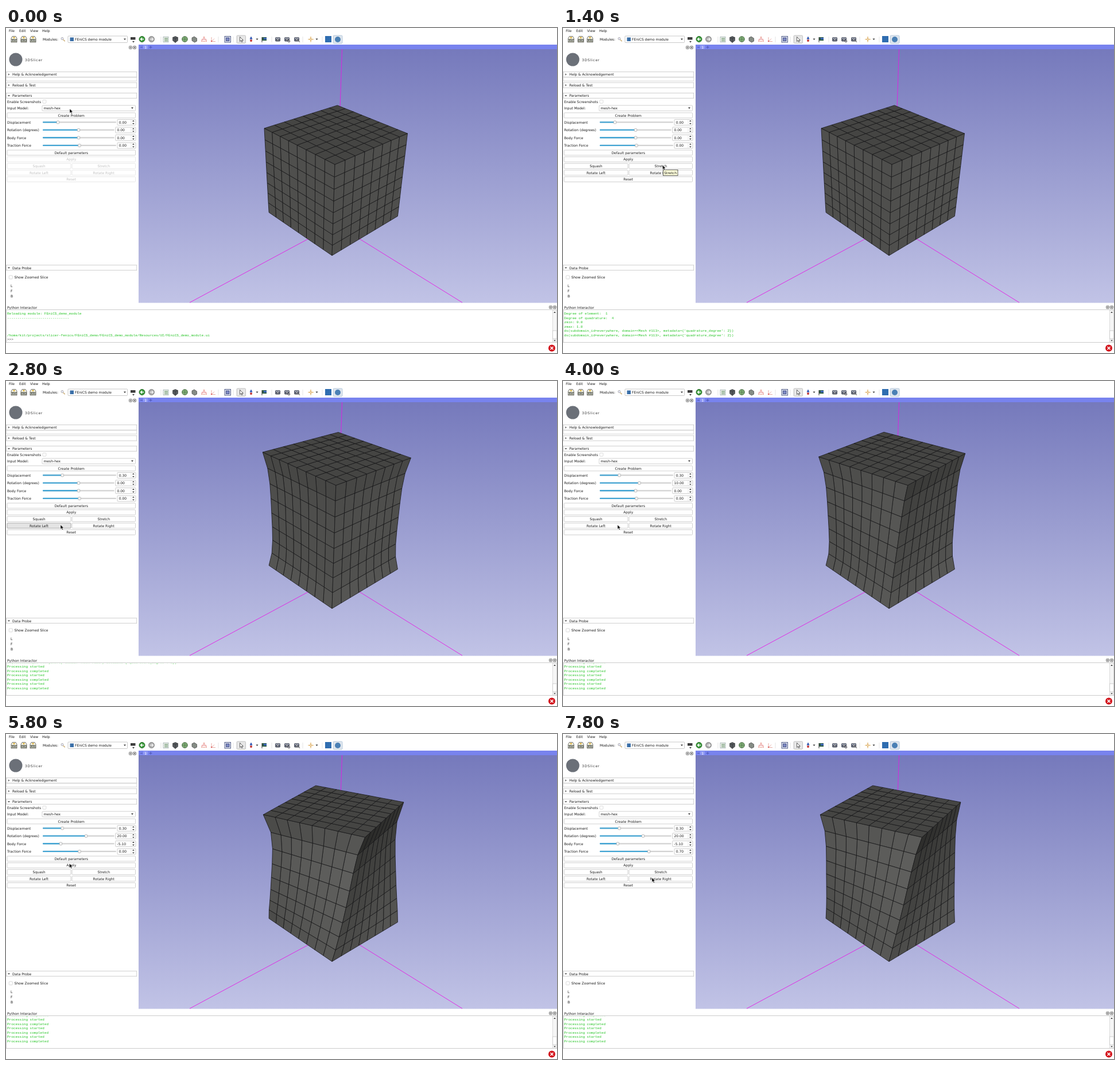
An HTML page that plays this animation: 960x567 px, repeating every 8 s.

```html
<!DOCTYPE html>
<html lang="en">
<head>
<meta charset="utf-8">
<title>Mesh deformation demo</title>
<style>
html, body { margin: 0; width: 100%; height: 100%; overflow: hidden; background: #fff; }
svg { display: block; width: 960px; height: 567px; }
text { font: 6px "DejaVu Sans", sans-serif; white-space: pre; }
.mono { font-family: "Liberation Mono", monospace; }
</style>
</head>
<body>
<svg id="stage" viewBox="0 0 960 567"></svg>
<script>
const LOOP = 8000, STEP = 200;
const stage = document.getElementById('stage');

// ---- drawing helpers (all return SVG markup)
const esc = s => s.replace(/&/g, '&amp;').replace(/</g, '&lt;');
const text = (x, y, s, fill = '#1c1c1c', more = '') =>
  `<text x="${x}" y="${y}" fill="${fill}" ${more}>${esc(s)}</text>`;
const mid = (x, y, s, fill) => text(x, y, s, fill, 'text-anchor="middle"');
const rect = (x, y, w, h, fill = '#fff', stroke = 'none', rx = 0) =>
  `<rect x="${x}" y="${y}" width="${w}" height="${h}" fill="${fill}" stroke="${stroke}" stroke-width=".8" rx="${rx}"/>`;
const path = (d, fill = 'none', stroke = 'none', w = 1) =>
  `<path d="${d}" fill="${fill}" stroke="${stroke}" stroke-width="${w}"/>`;
const dot = (x, y, r, fill, stroke = 'none') =>
  `<circle cx="${x}" cy="${y}" r="${r}" fill="${fill}" stroke="${stroke}"/>`;
const down = (x, y) => path(`M${x - 2} ${y - 1}h4l-2 2.4z`, '#333');

// ---- timing: stepped values and an interpolated pointer path
const stepped = (t, start, ...keys) => keys.reduce((v, [at, next]) => t >= at ? next : v, start);

const POINTER = [
  [0, 111, 141], [400, 114, 150], [800, 114, 150], [1200, 173.5, 239.5], [2200, 173.5, 239.5],
  [2600, 120, 250], [2800, 95, 251], [4600, 95, 251], [4800, 126, 189], [5000, 126, 189],
  [5400, 96, 189], [5800, 110.5, 226], [6000, 110.5, 226], [6200, 128, 203], [6400, 137, 203],
  [6600, 150, 203], [7000, 112, 226], [7200, 112, 226], [7400, 92, 237], [7800, 155, 251]
];
function pointerAt(t) {
  const i = POINTER.findIndex(p => p[0] >= t);
  if (i < 1) return POINTER[i ? POINTER.length - 1 : 0].slice(1);
  const [a, b] = [POINTER[i - 1], POINTER[i]], k = (t - a[0]) / (b[0] - a[0]);
  return [a[1] + (b[1] - a[1]) * k, a[2] + (b[2] - a[2]) * k];
}

function stateAt(t) {
  return {
    t,
    disp: stepped(t, 0, [1600, .1], [1800, .2], [2000, .3]),
    rot: stepped(t, 0, [3200, 10], [4400, 20]),
    body: stepped(t, 0, [5200, -2.6], [5400, -5.1]),
    traction: stepped(t, 0, [6400, .3], [6600, .7]),
    sag: stepped(t, 0, [5800, .28], [7000, .12]),
    bulge: stepped(t, 0, [7000, .025]),
    runs: stepped(t, 0, [1600, 1], [1800, 2], [2000, 3], [3200, 4], [4400, 5], [5800, 6], [7000, 7]),
    ready: t >= 600,
    hover: stepped(t, '', [400, 'Create Problem'], [600, ''], [1600, 'Stretch'], [2400, ''],
      [2800, 'Rotate Left'], [3800, '']),
    tip: t >= 1400 && t < 1600
  };
}

// ---- mesh: unit cube, origin at the top front corner, d runs downwards
const O = [573, 238, 1], X = [-55.8, -36.9, .1494], Y = [241, -23.9, .1637], D = [68.84, 210.6, .13];
const VIEW = [-.61, -.61, .5], N = 8;

function project([x, y, d]) {
  const [u, v, w] = O.map((o, i) => o + x * X[i] + y * Y[i] + d * D[i]);
  return (u / w).toFixed(1) + ' ' + (v / w).toFixed(1);
}
// Both ends are clamped; stretching narrows the middle, sagging moves the strain upwards.
function deform([x, y, d], s) {
  const h = 1 - d, a = s.rot * h * Math.PI / 180;
  const strain = s.disp + s.sag * (2 * h - 1);
  const k = 1 - (.27 * strain - s.bulge) * (1 - (2 * h - 1) ** 4);
  const c = Math.cos(a) * k, q = Math.sin(a) * k;
  x -= .5; y -= .5;
  return [.5 + x * c + y * q, .5 - x * q + y * c, d - s.disp * h + s.sag * h * d];
}
function shade([a, b, c, e]) {
  const u = c.map((v, i) => v - a[i]), w = e.map((v, i) => v - b[i]);
  const n = [u[1] * w[2] - u[2] * w[1], u[2] * w[0] - u[0] * w[2], u[0] * w[1] - u[1] * w[0]];
  const lit = Math.abs(n[0] * VIEW[0] + n[1] * VIEW[1] - n[2] * VIEW[2]) / Math.hypot(...n);
  const g = Math.round(25 + 88 * lit);
  return `rgb(${g},${g},${g - 2})`;
}
function mesh(s) {
  const faces = [(i, j) => [i, 0, j], (i, j) => [0, i, j], (i, j) => [i, j, 0]];
  let out = '';
  for (const face of faces)
    for (let i = 0; i < N; i++)
      for (let j = 0; j < N; j++) {
        const quad = [[0, 0], [1, 0], [1, 1], [0, 1]]
          .map(([p, q]) => deform(face((i + p) / N, (j + q) / N), s));
        out += path('M' + quad.map(project).join('L') + 'z', shade(quad), '#141414', .75);
      }
  return out;
}

function viewport(s) {
  return `<defs><linearGradient id="sky" x2="0" y2="1"><stop stop-color="#7478bb"/>
    <stop offset="1" stop-color="#c1c3e6"/></linearGradient></defs>` +
    rect(231, 29, 729, 450.5, 'url(#sky)') + rect(231, 29, 729, 8, '#7883ee') +
    rect(239, 30, 8, 6.5, '#8f99f5') + text(241.3, 35.8, '1', '#fff') +
    path('M234 33.5h4M252 31v5M249.5 33.5h5', 'none', '#4d56b8') +
    path('M585.5 37L582 140M545 358L320 479M600 358L795 479', 'none', '#e619e6', .9) + mesh(s);
}

// ---- toolbar
function toolbar() {
  const menu = [[5, 'File'], [23, 'Edit'], [42, 'View'], [63, 'Help']].map(([x, s]) => text(x, 7, s)).join('');
  const files = [[14, 'DATA'], [31, 'DCM'], [47, 'SAVE']].map(([x, s]) =>
    path(`M${x - 5} 18l2-3.5h6l2 3.5v7h-10z`, '#f4f2e2', '#444', .7) + path(`M${x - 2} 15.8h4l-2 2.6z`, '#d4a017') +
    rect(x - 5, 19.5, 10, 4.2, '#454a3c') +
    text(x, 22.9, s, '#fff', 'text-anchor="middle" style="font-size:3.4px;font-weight:bold"')).join('');
  const cube = (x, c) => path(`M${x} 14.5l4.5 2v5.5l-4.5 3.5-4.5-3.5v-5.5z`, c, '#333', .6) +
    path(`M${x - 4.5} 16.5l4.5 2 4.5-2M${x} 18.5v7`, 'none', '#222', .5);
  const camera = x => rect(x - 4, 16.5, 8, 6.5, '#6a7084', '#3a3f4c', 1) +
    rect(x - 3, 17.2, 6, 1.4, '#c4cad8') + dot(x, 20.4, 1.6, '#dfe4ee', '#333');
  const bars = [270, 370, 396, 463, 517, 551].map(x => path(`M${x} 15v10`, 'none', '#e4e4e4')).join('');
  return menu + files + bars + text(64, 22, 'Modules:') +
    dot(98, 18.5, 2, '#eef', '#aaa') + path('M99.8 20.2l2.8 3', 'none', '#c9a86a', 1.3) +
    rect(108, 14, 103.5, 11.5, '#fff', '#bbb', 1) + rect(111.5, 16.5, 6.5, 6.5, '#3b6fa8') +
    text(120, 22, 'FEniCS demo module') + down(207, 19.5) +
    rect(217, 16, 8.5, 4.5, '#3d3d3d') + down(222, 24) +
    dot(237, 19.5, 5, '#3b9a3b', '#2c6e2c') + path('M240 19.5h-5m2-2.4l-2.4 2.4 2.4 2.4', 'none', '#fff', 1.4) +
    dot(253.5, 19.5, 5, '#aaa', '#8a8a8a') + path('M251 19.5h5m-2-2.4l2.4 2.4-2.4 2.4', 'none', '#eee', 1.4) +
    rect(274, 15.5, 9, 9, '#f2f5ef', '#9aa', 0) + path('M276 18h6M276 20h6M276 22.4h6', 'none', '#4c7d52', .9) +
    cube(295, '#555a5e') + dot(311.5, 19.5, 4.8, '#7fae76', '#4a6a46') +
    path('M307 19.5h9M311.5 15v9', 'none', '#4a6a46', .6) +
    path('M324 17l4-2 4.5 3v5l-4 2-4.5-3z', '#858c85', '#444', .7) +
    path('M345 16v3.5M341.5 23v-3.5h7V23', 'none', '#d66', .8) +
    [[345, 16], [341.5, 23], [345, 23], [348.5, 23]].map(p => dot(...p, 1.1, '#e58a7c')).join('') +
    path('M358 16v7.5h7M358 23.5l5-5', 'none', '#e0988e', .8) + dot(358, 23, 1.2, '#d66') +
    rect(381, 14.5, 10.5, 10.5, '#dfe3f4', '#34406e') + rect(383.5, 17, 5.5, 5.5, '#7d89c4', '#34406e') +
    rect(402, 13, 15.5, 13.5, '#e6e6e6', '#b5b5b5', 1.5) +
    path('M407.5 15.5v8l2-1.8 1.3 2.8 1.1-.5-1.2-2.7h2.6z', '#fff', '#222', .7) +
    path('M427 14.5l2.5 5h-5z', '#274fae') + dot(427, 22, 2, '#c43a3a') + down(437.5, 19.5) +
    rect(446, 16, 8, 6, '#2d5c46') + rect(449, 17, 5, 3, '#3e66b8') + path('M446 16v9', 'none', '#333') +
    camera(473.5) + camera(489.5) + dot(493, 23, 1.6, '#dde', '#444') + camera(506.5) +
    path('M508 21l4 3.5', 'none', '#777', 1.2) +
    path('M531 15v9.5M526.3 19.7h9.5', 'none', '#d9a24a', 1.1) + dot(531, 19.7, 1.5, '#fff', '#d9a24a') +
    down(541.5, 19.5) + rect(556, 14, 11, 11, '#2f6db0') +
    rect(570, 13, 16, 14, '#dfe6ee', '#a9bfd6', 1.5) + dot(578, 20, 5, '#4a80b5');
}

// ---- side panel
const dockIcons = (x, y) =>
  [x, x + 7].map(c => rect(c - 2.4, y - 2.4, 4.8, 4.8, '#fff', '#555', .8)).join('') +
  dot(x, y, .9, 'none', '#555') + path(`M${x + 5.6} ${y - 1.4}l2.8 2.8m0-2.8l-2.8 2.8`, 'none', '#333', .8);

function header(y, label, open) {
  const mark = open ? `M3 ${y - .8}h4l-2 2.2z` : `M4.2 ${y - 1.8}v3.6l2-1.8z`;
  return rect(.4, y - 4.6, 227.4, 9, '#fff', '#c4c4c4') + path(mark, '#444') + text(11, y + 2.2, label);
}
function button(s, x, w, y, label, on = true) {
  const hot = s.hover === label;
  return rect(x, y - 4.5, w, 9, hot ? '#e4e4e4' : '#fff', hot ? '#9c9c9c' : on ? '#c4c4c4' : '#e2e2e2', 1) +
    mid(x + w / 2, y + 2.2, label, on ? undefined : '#c0c0c0');
}
function slider(y, label, value, end, zero, scale) {
  const x = zero + value * scale, box = end + 2;
  return text(2, y + 2.2, label) + rect(64, y - 1.2, end - 64, 2.2, '#d2d2d2', 'none', 1) +
    rect(64, y - 1.3, x - 64, 2.4, '#43a5d4', 'none', 1) +
    rect(x - 2.2, y - 2.4, 4.4, 4.8, '#fafafa', '#aaa', 1) +
    rect(box, y - 5, 226 - box, 10, '#fff', '#c0c0c0', 1) + path(`M218 ${y - 5}v10`, 'none', '#ddd', .7) +
    text(box + 2.8, y + 2.3, value.toFixed(2)) +
    path(`M220 ${y - 1.4}l1.9-2.2 1.9 2.2zM220 ${y + 1.4}l1.9 2.2 1.9-2.2z`, '#333');
}
function panel(s) {
  const on = s.ready;
  return dockIcons(217, 34) + dot(17, 55, 11.5, '#6b7078') +
    text(33, 57.6, '3DSlicer', '#333', 'letter-spacing=".75"') +
    header(81, 'Help & Acknowledgement') + rect(.4, 86, 227.4, 6.5, '#fff', '#d0d0d0') +
    header(99.8, 'Reload & Test') + header(118, 'Parameters', true) +
    text(2, 131, 'Enable Screenshots') + rect(64, 125.5, 5.8, 5.8, '#fff', '#d4d4d4', 1) +
    text(2, 142, 'Input Model:') + rect(63, 135, 162.5, 9.6, '#fff', '#c4c4c4', 1) +
    text(65.5, 142, 'mesh-hex') + down(220, 139.5) +
    button(s, 2, 223.5, 152.4, 'Create Problem') +
    slider(164.5, 'Displacement', s.disp, 192, 90.5, 25.5) +
    slider(178, 'Rotation (degrees)', s.rot, 188.7, 126.5, .65) +
    slider(191.4, 'Body Force', s.body, 188.7, 126.5, 6.1) +
    slider(205, 'Traction Force', s.traction, 192, 128, 31) +
    button(s, 2, 223.5, 217.5, 'Default parameters') + button(s, 2, 223.5, 229.2, 'Apply', on) +
    button(s, 2, 111, 240.8, 'Squash', on) + button(s, 115, 110.5, 240.8, 'Stretch', on) +
    button(s, 2, 111, 252.4, 'Rotate Left', on) + button(s, 115, 110.5, 252.4, 'Rotate Right', on) +
    button(s, 2, 223.5, 264, 'Reset', on) +
    header(418.3, 'Data Probe', true) + rect(5.3, 431.8, 6, 6, '#fff', '#d0d0d0', 1) +
    text(14.5, 437, 'Show Zoomed Slice') + text(8, 452.2, 'L') + text(8, 461.2, 'F') + text(8, 470.2, 'B');
}

// ---- console
const FORM = "ds(subdomain_id=everywhere, domain=<Mesh #113>, metadata={'quadrature_degree': 2})";
const LOADED = ['Reloading module: FEniCS_demo_module', '-'.repeat(30), '', '', '',
  '/home/kit/projects/slicer-fenics/FEniCS_demo/FEniCS_demo_module/Resources/UI/FEniCS_demo_module.ui'];
const CREATED = ['Degree of element:  1', 'Degree of quadrature:  4', 'zmin: 0.0', 'zmax: 1.0', FORM, FORM];

function output(s) {
  let lines = s.ready ? CREATED : LOADED;
  for (let i = 0; i < s.runs; i++) lines = [...lines, 'Processing started', 'Processing completed'];
  const shown = lines.slice(-7);
  return text(2, 489.6, 'Python Interactor') + dockIcons(949, 487.2) +
    rect(.4, 491.6, 959.2, 57, '#fff', '#c0c0c0') +
    '<clipPath id="log"><path d="M0 492.8h952v56H0z"/></clipPath><g clip-path="url(#log)">' +
    shown.map((l, i) => text(2, 537.7 - 7.5 * (shown.length - 1 - i), l, '#22c322', 'class="mono"')).join('') +
    (s.ready ? '' : text(2, 545.2, '>>>', '#444', 'class="mono"')) + '</g>' +
    rect(952.6, 492, 6.8, 56, '#f6f6f6', '#d4d4d4') + rect(952.6, 528, 6.8, 14, '#fff', '#c4c4c4') +
    path('M954.2 497l1.8-2.2 1.8 2.2zM954.2 544.4l1.8 2.2 1.8-2.2z', '#333') +
    dot(951, 558.5, 6, '#d3141c') + path('M948.5 556l5 5m0-5l-5 5', 'none', '#fff', 1.6);
}

function overlay(s) {
  const [x, y] = pointerAt(s.t);
  const tip = s.tip ? rect(174.4, 247.4, 25.6, 10, '#ffffdc', '#333') + text(176.3, 254.8, 'Stretch') : '';
  return tip + `<g transform="translate(${x} ${y})">` +
    path('M0 0v7.4l1.7-1.6 1.4 3 1.3-.6-1.4-2.9h2.5z', '#000', '#fff', .5) + '</g>';
}

let last = -1;
function tick(now) {
  const t = Math.floor(now % LOOP / STEP) * STEP;
  if (t !== last) {
    last = t;
    const s = stateAt(t);
    stage.innerHTML = viewport(s) + toolbar() + panel(s) + output(s) + overlay(s);
  }
  requestAnimationFrame(tick);
}
tick(performance.now());
</script>
</body>
</html>
```
